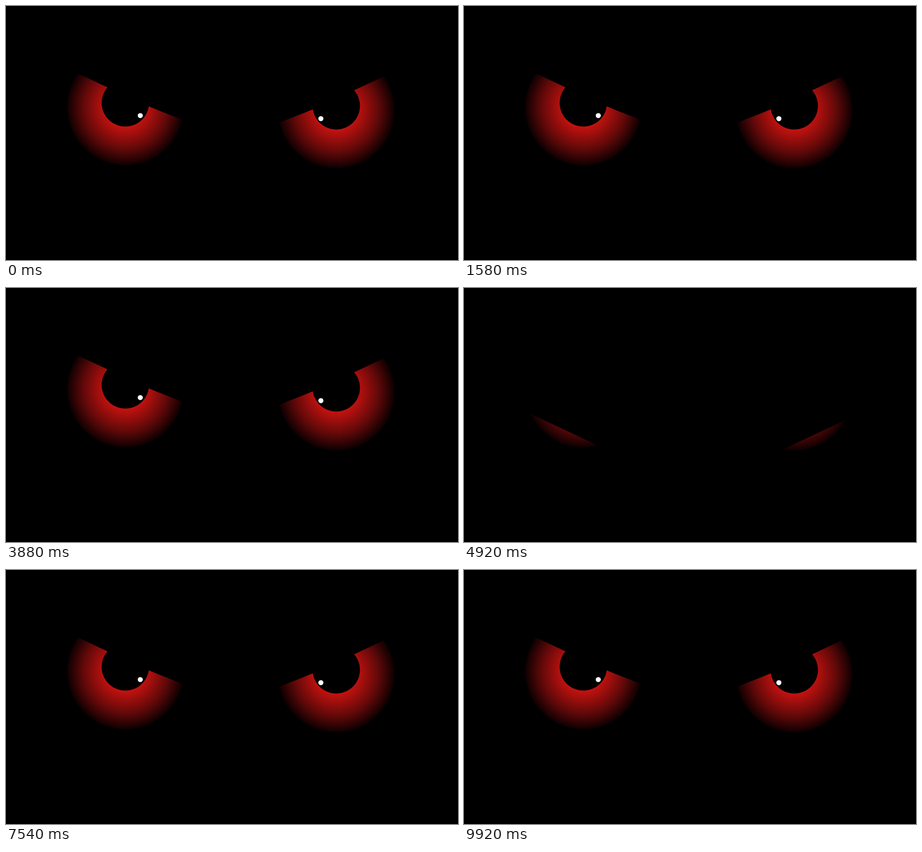
An HTML page with a canvas that plays this animation: 998 px wide and 561 px high, repeating every 9960 ms.

```html
<!DOCTYPE html>
<html lang="en">
<head>
<meta charset="utf-8">
<title>Blinking eyes</title>
<style>
  html, body { margin: 0; width: 100%; height: 100%; overflow: hidden; background: #000; }
  canvas { display: block; }
</style>
</head>
<body>
<canvas id="stage" width="998" height="561"></canvas>
<script>
const ctx = document.getElementById('stage').getContext('2d');
const LOOP = 9960, FPS = 24, BLINK_EVERY = 50;
const BLINK_MID = 17, BLINK_HALF = 5;
const IRIS_R = 128.5;

// Each eye has its own origin at the iris centre; side -1 mirrors the lid.
const eyes = [
  { x: 263.5, y: 223.5, side: 1, travel: 168, glintX: 296.5, glintY: 242 },
  { x: 729.2, y: 230, side: -1, travel: 175, glintX: 695.2, glintY: 248.8 }
];

function disc(x, y, r, fill) {
  ctx.fillStyle = fill;
  ctx.beginPath();
  ctx.arc(x, y, r, 0, Math.PI * 2);
  ctx.fill();
}

const iris = ctx.createRadialGradient(0, 0, 0, 0, 0, IRIS_R);
iris.addColorStop(0, 'rgb(196,19,16)');
iris.addColorStop(0.35, 'rgb(192,18,15)');
iris.addColorStop(0.72, 'rgb(98,9,9)');
iris.addColorStop(1, 'rgb(14,0,1)');

function drawLid(drop) {
  ctx.fillStyle = '#000';
  ctx.beginPath();
  ctx.moveTo(-160, -400);
  ctx.lineTo(-160, drop - 100.4);
  ctx.lineTo(16.5, drop - 17.5);
  ctx.quadraticCurveTo(44.5, drop - 4.4, 72.5, drop + 6.8);
  ctx.lineTo(160, drop + 41);
  ctx.lineTo(160, -400);
  ctx.fill();
}

function drawEye(eye, closed) {
  ctx.save();
  ctx.translate(eye.x, eye.y);
  disc(0, 0, IRIS_R, iris);
  disc(0, -9.6, 52.3, '#000');
  disc(eye.glintX - eye.x, eye.glintY - eye.y, 5.6, '#fff');
  ctx.scale(eye.side, 1);
  drawLid(closed * eye.travel);
  ctx.restore();
}

function draw(time) {
  const step = Math.floor((time % LOOP + 5) * FPS / 1000);
  const phase = step % BLINK_EVERY;
  const closed = Math.max(0, 1 - Math.abs(phase - BLINK_MID) / BLINK_HALF);
  ctx.fillStyle = '#000';
  ctx.fillRect(0, 0, 998, 561);
  for (const eye of eyes) drawEye(eye, closed);
}

const start = performance.now();
function tick() {
  draw(performance.now() - start);
  requestAnimationFrame(tick);
}
tick();
</script>
</body>
</html>
```
